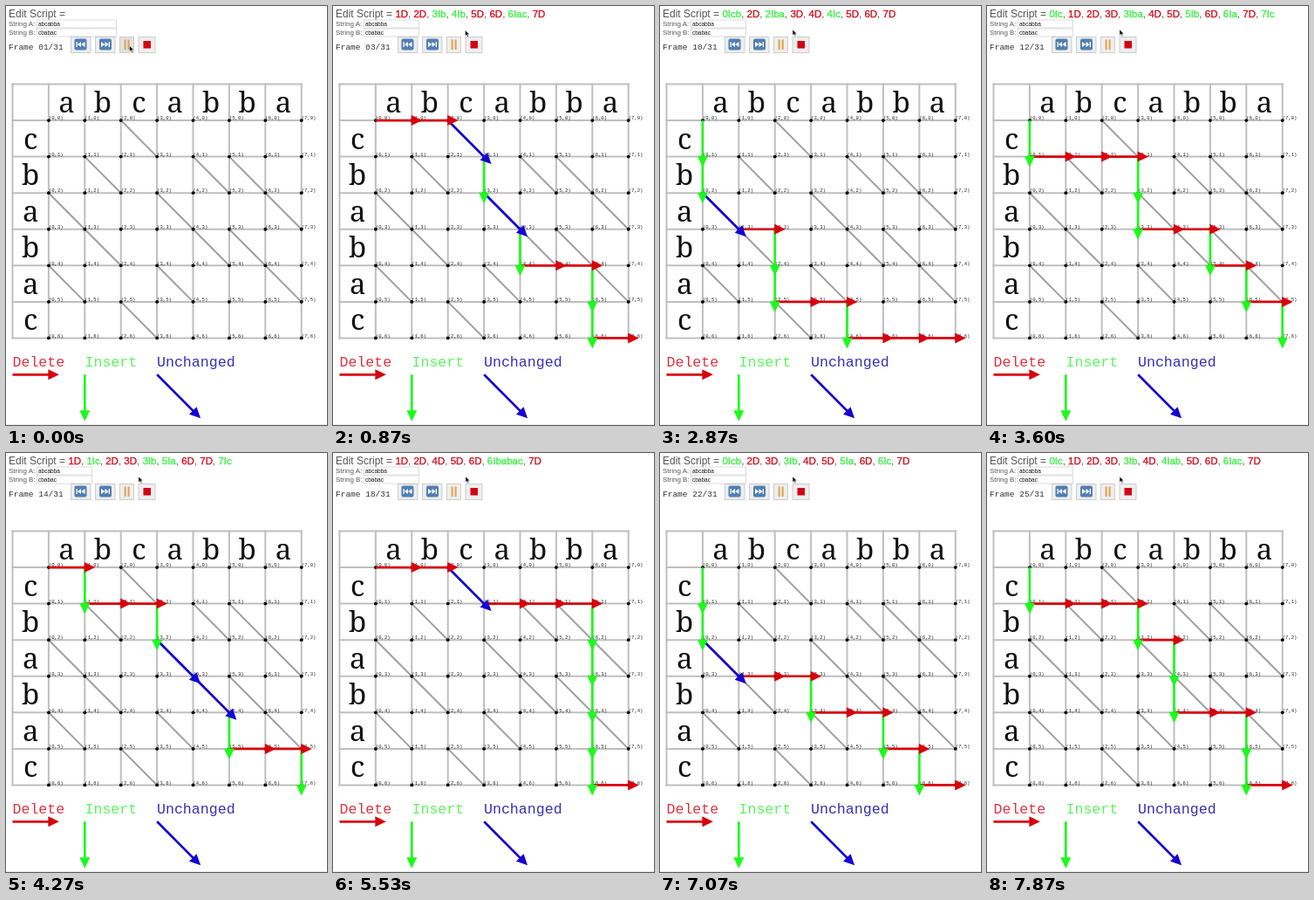
Recreate the animation shown at these times as an HTML page. Size 368 by 480 pixels, loop 8 s.

```html
<!DOCTYPE html>
<html lang="en">
<head>
<meta charset="utf-8">
<title>Edit graph</title>
<style>
  html, body { margin: 0; width: 100%; height: 100%; overflow: hidden; background: #fff; }
  svg { display: block; width: 368px; height: 480px; }
  text { white-space: pre; }
  .sans { font-family: "Liberation Sans", Arial, sans-serif; fill: #555; }
  .mono { font-family: "Liberation Mono", "Courier New", monospace; }
  .letter { font: 300 33px "Noto Serif", serif; text-anchor: middle; fill: #111; }
  .node { font-size: 5.6px; fill: #222; }
  .key { font-size: 16.6px; }
  .grid { stroke: #bfbfbf; stroke-width: 2; fill: none; }
  .match { stroke: #a0a0a0; stroke-width: 2; }
  .button { fill: #eee; stroke: #c4c4c4; stroke-width: .8; }
  .field { fill: #fff; stroke: #d4d4d4; stroke-width: .8; }
  .icon { fill: #507fb2; }
  .glyph { fill: #fff; }
</style>
</head>
<body>
<svg viewBox="0 0 368 480">
  <rect width="368" height="480" fill="#fff"/>
  <text class="sans" x="3" y="13" font-size="12">Edit Script = <tspan id="script" font-size="11.5"></tspan></text>
  <g class="sans" font-size="8">
    <text x="3" y="23">String A:</text>
    <text x="3" y="33">String B:</text>
  </g>
  <rect class="field" x="35.5" y="16" width="63" height="9"/>
  <rect class="field" x="35.5" y="26" width="63" height="9"/>
  <g class="sans" font-size="6.5" style="fill:#111">
    <text x="37" y="23.2">abcabba</text>
    <text x="37" y="33.2">cbabac</text>
  </g>
  <text id="counter" class="mono" x="3" y="50" font-size="9.5" fill="#333"></text>

  <g id="skip">
    <rect class="button" x="74.5" y="35.5" width="22.5" height="18"/>
    <rect class="icon" x="78.5" y="37.5" width="14" height="13" rx="2"/>
    <path class="glyph" d="M80.5 41h1.3v6h-1.3z M86 41v6l-4-3z M90.5 41v6l-4.3-3z"/>
  </g>
  <use href="#skip" transform="translate(199.5 0) scale(-1 1)"/>
  <rect id="pause" class="button" x="130.5" y="35.5" width="16" height="18"/>
  <path d="M136.6 38.5v11.5 M140.6 38.5v11.5" stroke="#dda24c" stroke-width="2"/>
  <rect class="button" x="152" y="35.5" width="19" height="18"/>
  <rect x="157.5" y="40" width="8.5" height="8.5" fill="#d40014"/>

  <g id="graph"></g>
  <g id="legend"></g>
  <g id="path"></g>
  <path id="cursor" d="M0 0v6.6l1.6-1.4 1.2 2.4 1.1-.6-1.2-2.2 2.2-.1z" fill="#111" stroke="#fff" stroke-width=".4"/>
  <path d="M0 479.5h368" stroke="#ececec"/>
</svg>
<script>
const LOOP = 8000;
const A = "abcabba", B = "cbabac";
const RED = "#d8000c", GREEN = "#1cfa1c", BLUE = "#1400d4";

// D deletes (right), I inserts (down), U keeps a shared letter (diagonal)
const MOVES = {
  D: { dx: 1, dy: 0, color: RED },
  I: { dx: 0, dy: 1, color: GREEN },
  U: { dx: 1, dy: 1, color: BLUE }
};

const STEPS = [
  [0, ""],
  [330, "DDDDDDDIIIIII"],
  [630, "DDUIUIDDIID"],
  [960, "DIUIDDIDDDII"],
  [1270, "IDDIIDIIDIDDD"],
  [1590, "IIIIIIDDDDDDD"],
  [1930, "IIIDUDIDIDDD"],
  [2240, "IDDIIDDIDIDID"],
  [2530, "IIDDIDIDIIDDD"],
  [2865, "IIUDIIDDIDDD"],
  [3190, "DIUDUIDIDDI"],
  [3520, "IDDDIIDDIDIDI"],
  [3850, "DDUDIDIIDIID"],
  [4200, "DIDDIUUIDDI"],
  [4530, "IDUIDDIDIIDD"],
  [4865, "DIDDIUDDIDII"],
  [5130, "DDIDIDDIIDIID"],
  [5470, "DDUDDDIIIIID"],
  [5865, "DIDDIDIIDDIID"],
  [6195, "IIUDIDDDIDID"],
  [6470, "IDIDDIIDDIDID"],
  [6800, "IIUDDIDDIDID"],
  [7140, "DDUIDIIDDIID"],
  [7470, "DDIDIDIIDDIID"],
  [7800, "IDDDIDIIDDIID"]
];

const $ = id => document.getElementById(id);
const colX = i => 48.9 + 41.4 * i;
const rowY = j => 131.05 + 41.57 * j;

const line = (cls, x1, y1, x2, y2) =>
  `<line class="${cls}" x1="${x1}" y1="${y1}" x2="${x2}" y2="${y2}"/>`;
const label = (cls, x, y, s, fill = "") =>
  `<text class="${cls}" x="${x}" y="${y}"${fill && ` fill="${fill}"`}>${s}</text>`;

function arrow(x, y, { dx, dy, color }) {
  const w = dx * 41.4, h = dy * 41.57;
  const angle = Math.atan2(h, w) * 180 / Math.PI;
  return `<g transform="translate(${x} ${y})" fill="${color}">
    <path d="M0 0L${w} ${h}" stroke="${color}" stroke-width="2.7"/>
    <path d="M-.5-6L12 0L-.5 6z" transform="translate(${w} ${h}) rotate(${angle})"/></g>`;
}

function drawGraph() {
  let out = "";
  for (let i = -1; i <= 7; i++) out += line("grid", colX(i), rowY(-1) - 1, colX(i), rowY(6) + 1);
  for (let j = -1; j <= 6; j++) out += line("grid", colX(-1) - 1, rowY(j), colX(7) + 1, rowY(j));
  [...A].forEach((a, i) => [...B].forEach((b, j) => {
    if (a === b) out += line("match", colX(i), rowY(j), colX(i + 1), rowY(j + 1));
  }));
  [...A].forEach((a, i) => out += label("letter", colX(i + .5), rowY(0) - 9, a));
  [...B].forEach((b, j) => out += label("letter", colX(-.5), rowY(j + 1) - 9, b));
  for (let i = 0; i <= 7; i++) for (let j = 0; j <= 6; j++) {
    out += `<circle cx="${colX(i)}" cy="${rowY(j)}" r="1.9"/>`;
    out += label("mono node", colX(i), rowY(j) - .8, `(${i},${j})`);
  }
  $("graph").innerHTML = out;
}

function drawLegend() {
  $("legend").innerHTML =
    label("mono key", 7.5, 412.5, "Delete", "#dc3440") + arrow(7.5, 422.3, MOVES.D) +
    label("mono key", 90.5, 412.5, "Insert", "#5cf65c") + arrow(90.3, 422.3, MOVES.I) +
    label("mono key", 173, 412.5, "Unchanged", "#3a2eb4") + arrow(173.2, 422.3, MOVES.U);
}

function drawStep(index) {
  const moves = STEPS[index][1];
  const edits = [];
  let arrows = "", x = 0, y = 0, previous = "";
  for (const m of moves) {
    const move = MOVES[m];
    // earlier arrows lie on top of later ones
    arrows = arrow(colX(x), rowY(y), move) + arrows;
    x += move.dx;
    y += move.dy;
    if (m === "D") edits.push({ text: x + "D", color: "#d2101e" });
    if (m === "I") {
      if (previous === "I") edits[edits.length - 1].text += B[y - 1];
      else edits.push({ text: x + "I" + B[y - 1], color: "#3cf046" });
    }
    previous = m;
  }
  $("path").innerHTML = arrows;
  $("script").innerHTML = edits.map(e =>
    `<tspan fill="${e.color}" stroke="${e.color}" stroke-width=".35">${e.text}</tspan>`).join(", ");
  $("counter").textContent = `Frame ${String(index + 1).padStart(2, "0")}/31`;
}

function moveCursor(t) {
  const p = Math.min(1, Math.max(0, (t - 470) / 460));
  const k = p * p * (3 - 2 * p);
  $("cursor").setAttribute("transform", `translate(${141.5 + 10.5 * k} ${45.5 - 18.5 * k})`);
  $("pause").style.fill = t < 470 ? "#e2e2e2" : "";
  document.querySelectorAll(".field").forEach(f => f.setAttribute("width", t < 470 ? 91 : 63));
}

let shown = -1;
function tick() {
  const t = performance.now() % LOOP;
  const index = STEPS.findLastIndex(([start]) => start <= t);
  if (index !== shown) drawStep(shown = index);
  moveCursor(t);
  requestAnimationFrame(tick);
}

drawGraph();
drawLegend();
tick();
</script>
</body>
</html>
```
